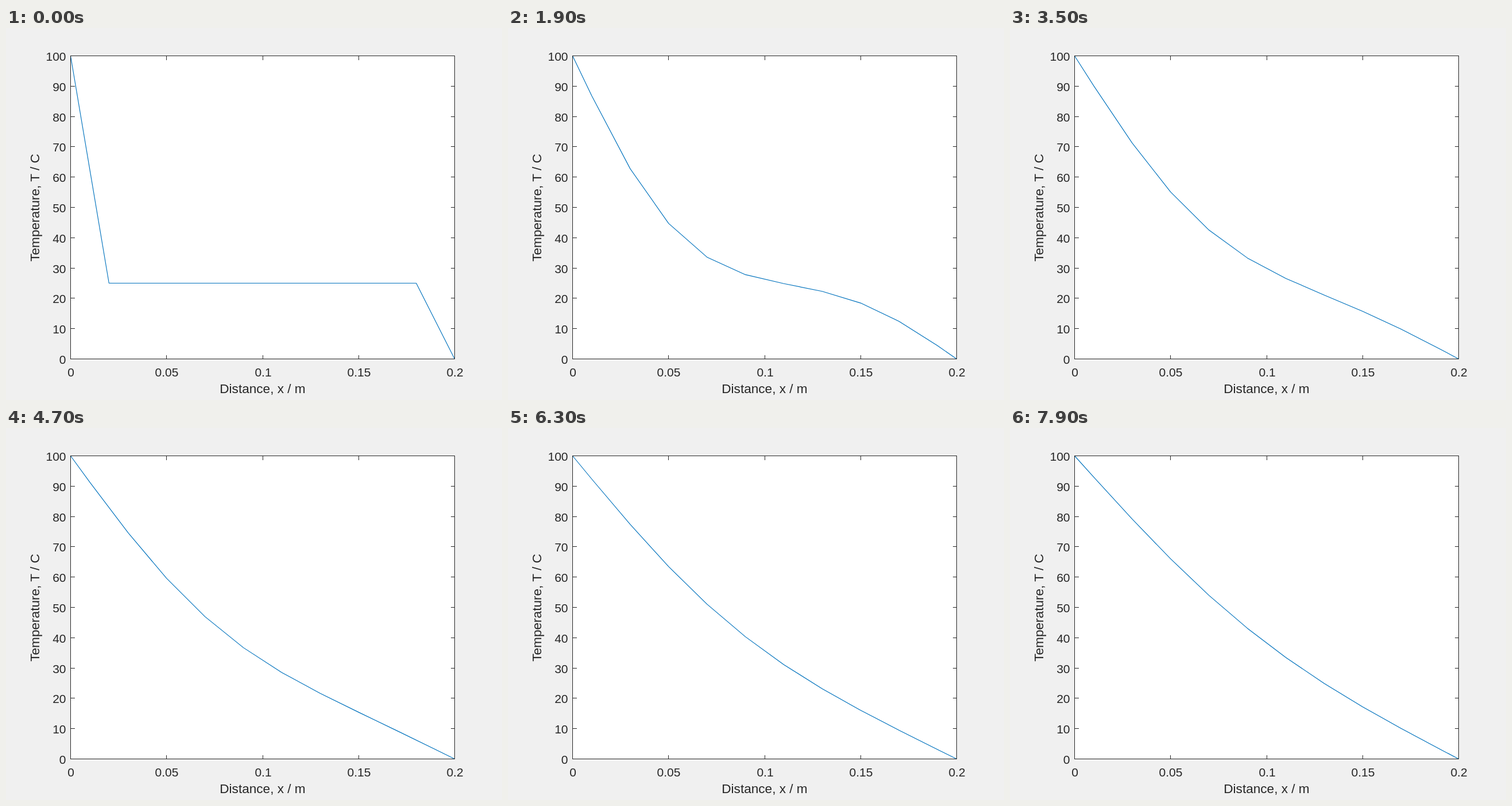
An HTML page that plays this animation: 864x648 px, repeating every 8000 ms.

```html
<!DOCTYPE html>
<html lang="en">
<head>
<meta charset="utf-8">
<title>Heat conduction along a bar</title>
<style>
  html, body { margin: 0; width: 100%; height: 100%; overflow: hidden; background: #f0f0f0; }
  svg { display: block; width: 864px; height: 648px; }
  text { font-family: "Liberation Sans", Arial, sans-serif; font-size: 21px; fill: #262626; text-anchor: middle; }
  .left text { text-anchor: end; }
  .title { font-size: 22.6px; }
  .axes { fill: none; stroke: #262626; shape-rendering: crispEdges; }
  .curve { fill: none; stroke: #0072bd; stroke-width: 1.15; stroke-linejoin: round; }
</style>
</head>
<body>
<svg viewBox="0 0 864 648">
  <rect x="112.5" y="48.5" width="669" height="528" fill="#fff"/>
  <polyline class="curve" id="curve"/>
  <path class="axes" id="axes"/>
  <g id="xLabels"></g>
  <g id="yLabels" class="left"></g>
  <text class="title" x="447" y="636">Distance, x / m</text>
  <text class="title" transform="translate(58 313) rotate(-90)">Temperature, T / C</text>
</svg>
<script>
  const LEFT = 112.5, RIGHT = 781.5, TOP = 48.5, BOTTOM = 576.5, TICK = 7;
  const LENGTH = 0.2, HOT = 100, COLD = 0, START = 25, CELLS = 10;
  const STEP_MS = 100, LOOP_MS = 8000;

  const el = id => document.getElementById(id);
  const px = x => LEFT + (RIGHT - LEFT) * x / LENGTH;
  const py = t => BOTTOM - (BOTTOM - TOP) * t / 100;
  const snap = v => Math.floor(v) + 0.5;

  function addLabel(group, x, y, value) {
    const text = document.createElementNS("http://www.w3.org/2000/svg", "text");
    text.setAttribute("x", x);
    text.setAttribute("y", y);
    text.textContent = value;
    el(group).append(text);
  }

  function drawAxes() {
    let d = `M${LEFT} ${TOP}H${RIGHT}V${BOTTOM}H${LEFT}Z`;
    for (let i = 0; i <= 4; i++) {
      const value = i / 20, x = snap(px(value));
      d += `M${x} ${TOP}v${TICK}M${x} ${BOTTOM}v${-TICK}`;
      addLabel("xLabels", x + 0.5, 607, value);
    }
    for (let value = 0; value <= 100; value += 10) {
      const y = snap(py(value));
      d += `M${LEFT} ${y}h${TICK}M${RIGHT} ${y}h${-TICK}`;
      addLabel("yLabels", 104.5, y + 8.5, value);
    }
    el("axes").setAttribute("d", d);
  }

  // Each step averages neighbours, so the nodes alternate between two staggered grids.
  function profile(step) {
    const dx = LENGTH / CELLS;
    let nodes = Array.from({ length: CELLS + 1 }, (_, i) => [i * dx, START]);
    nodes[0][1] = HOT;
    nodes[CELLS][1] = COLD;
    for (let n = 0; n < step; n++) {
      const ends = n % 2 ? nodes.slice(1, -1) : nodes;
      const mids = ends.slice(1).map(([x, t], i) => [(x + ends[i][0]) / 2, (t + ends[i][1]) / 2]);
      nodes = [[0, HOT], ...mids, [LENGTH, COLD]];
    }
    return nodes;
  }

  let shown = -1;
  function draw() {
    const step = Math.floor(performance.now() % LOOP_MS / STEP_MS);
    if (step !== shown) {
      shown = step;
      el("curve").setAttribute("points", profile(step).map(([x, t]) => `${px(x)},${py(t)}`).join(" "));
    }
    requestAnimationFrame(draw);
  }

  drawAxes();
  draw();
</script>
</body>
</html>
```
